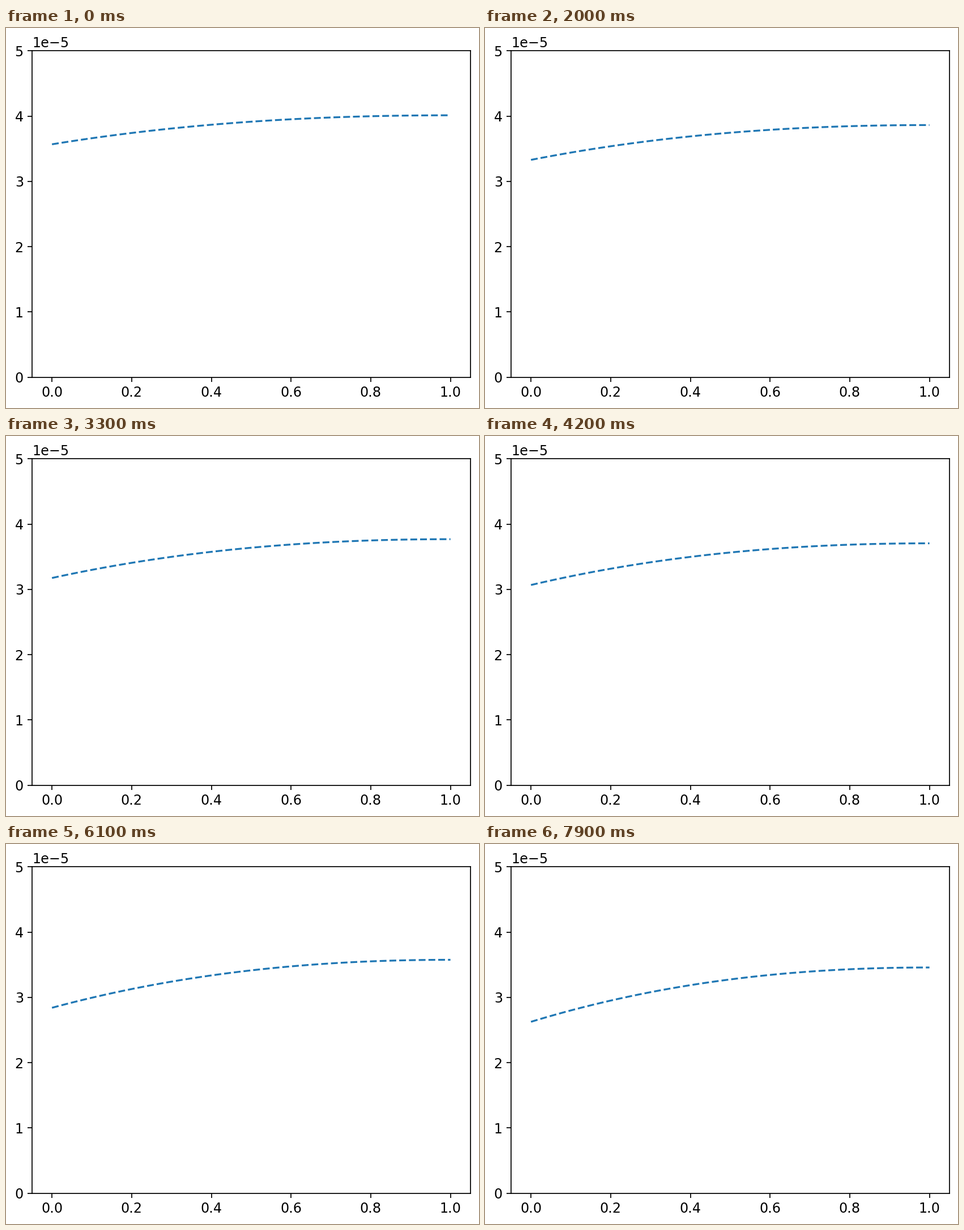
A matplotlib script for the animation above (8 s loop, 835 by 671 pixels).

```python
import numpy as np
import matplotlib.pyplot as plt
from matplotlib.animation import FuncAnimation

W, H, DPI = 835, 671, 156
FRAMES, INTERVAL = 80, 100
UNIT = 1e-5

plt.rcParams.update({"font.family": "DejaVu Sans", "font.size": 11})

# The tiny offset keeps the canvas from rounding down a pixel
fig = plt.figure(figsize=((W + 1e-6) / DPI, (H + 1e-6) / DPI), dpi=DPI)
ax = fig.add_axes([46 / W, 54.2 / H, 773.76 / W, 576.58 / H])
ax.set_xlim(-0.05, 1.05)
ax.set_ylim(0, 5 * UNIT)

x = np.linspace(0, 1, 101)
u = 1 - x
shape = u**2 * (0.76 + 0.24 * u)  # 1 at the left end, flat at the right

line, = ax.plot(x, np.zeros_like(x), "--", color="#1f77b4", lw=1.5)


def profile(t):
    """Curve at t seconds: the left end sinks steadily, the right one slows."""
    left = 3.568 - 0.1192 * t
    right = 4.012 - 0.0763 * t + 0.00078 * t**2
    return (right + (left - right) * shape) * UNIT


def update(i):
    line.set_ydata(profile(i * INTERVAL / 1000))
    return line,


anim = FuncAnimation(fig, update, frames=FRAMES, interval=INTERVAL,
                     repeat=True, repeat_delay=0)
plt.show()
```
